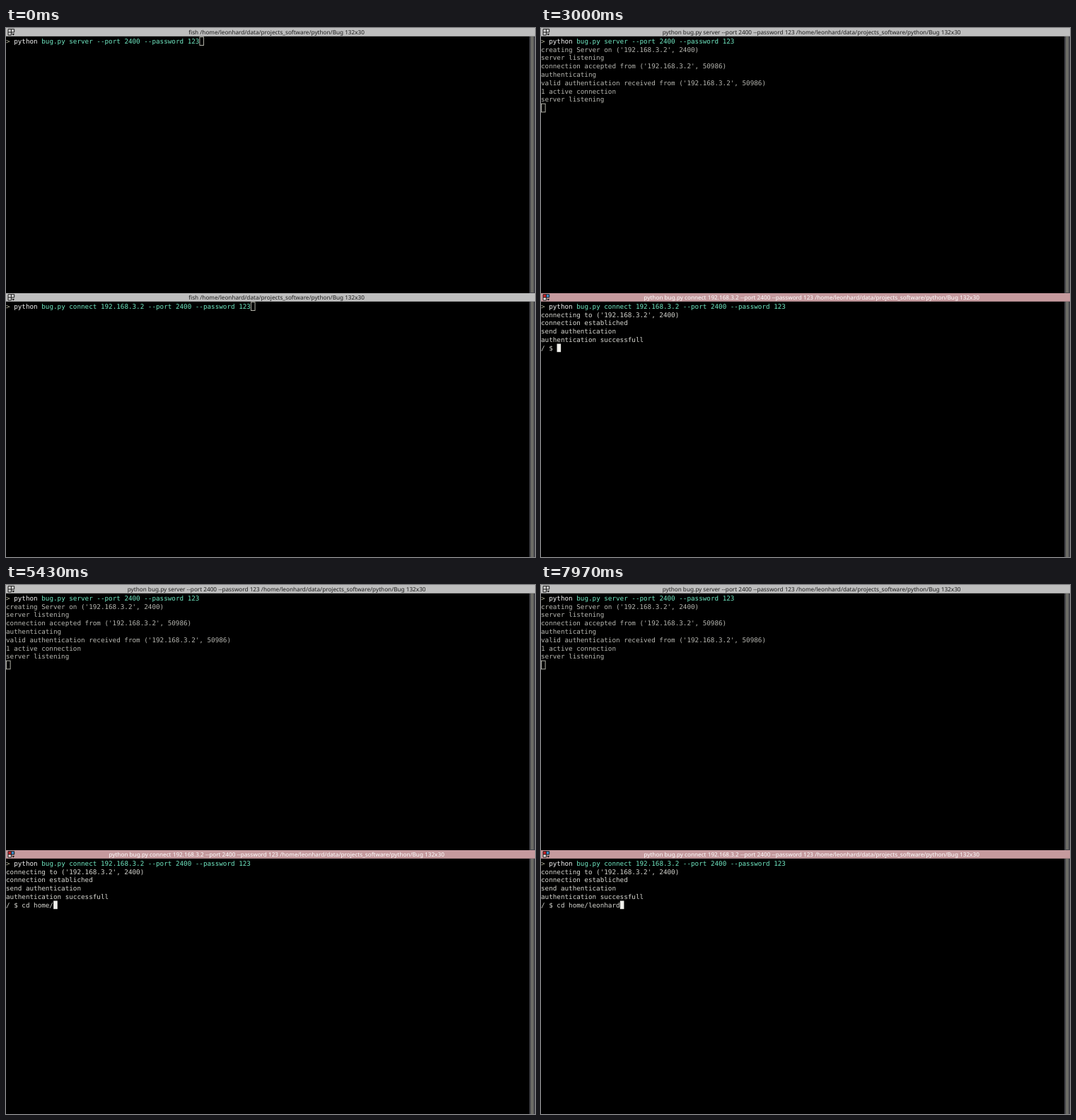
Recreate the animation shown at these times as an HTML page. Size 748 by 748 pixels, loop 8000 ms.

```html
<!DOCTYPE html>
<html lang="en">
<head>
<meta charset="utf-8">
<title>Two terminals</title>
<style>
  html, body { margin: 0; width: 100%; height: 100%; overflow: hidden; background: #000; }
  svg { display: block; width: 100vw; height: 100vh; }
  text { white-space: pre; text-rendering: geometricPrecision; }
  .mono { font: 9.27px "DejaVu Sans Mono", monospace; }
  .title { font: 8.2px "Noto Sans", "Open Sans", sans-serif; text-anchor: middle; }
</style>
</head>
<body>
<svg id="stage" viewBox="0 0 748 748"></svg>
<script>
const LOOP = 8000, CHAR = 5.58, LINE = 11.8;
const CWD = '/home/leonhard/data/projects_software/python/Bug 132x30';
const ADDR = "('192.168.3.2', ";
const TYPED = 'cd home/leonhard';
const SERVER = 'bug.py server --port 2400 --password 123';
const CLIENT = 'bug.py connect 192.168.3.2 --port 2400 --password 123';

// When each pane gets the focus, each command starts, and typing runs
const FOCUS_TOP = 600, FOCUS_BOTTOM = 1800;
const RUN_SERVER = 1450, RUN_CLIENT = 2550;
const TYPE_START = 2960, TYPE_STEP = 305;

const serverLog = [
  [1560, `creating Server on ${ADDR}2400)`],
  [1560, 'server listening'],
  [2610, `connection accepted from ${ADDR}50986)`],
  [2610, 'authenticating'],
  [2720, `valid authentication received from ${ADDR}50986)`],
  [2720, '1 active connection'],
  [2720, 'server listening']
];
const clientLog = [
  [2610, `connecting to ${ADDR}2400)`],
  [2610, 'connection establiched'],
  [2610, 'send authentication'],
  [2720, 'authentication successfull']
];

const stage = document.getElementById('stage');
const rect = (x, y, w, h, fill, more = '') =>
  `<rect x="${x}" y="${y}" width="${w}" height="${h}" fill="${fill}" ${more}/>`;
const span = (s, fill) => `<tspan fill="${fill}">${s}</tspan>`;
const row = (i, s) => `<text class="mono" x="0" y="${21.7 + i * LINE}">${s}</text>`;

function icon(active) {
  const [a, b, c] = active ? ['#d8232a', '#3c8fd0', '#e8e4e4'] : ['#d2d2d2', '#d2d2d2', '#d2d2d2'];
  return rect(3, 1.5, 4.5, 4.5, a) + rect(7.5, 1.5, 4.5, 4.5, b) + rect(3, 6, 4.5, 4, c) +
    `<path d="M3 1.7H11.7V6H3ZM3 6V10H7.4V1.7" fill="none" stroke="#181818" stroke-width="1"/>
     <path d="M8.3 8H12.2L10.2 10.6Z" fill="#181818"/>`;
}

function cursor(col, line, active) {
  const x = col * CHAR, y = 12.5 + line * LINE;
  return active
    ? rect(x + .2, y, 5.6, 11.7, '#f0f0ec')
    : rect(x + .5, y + .2, 5.6, 11.8, 'none', 'stroke="#c4c4b8" stroke-width=".9"');
}

function pane(y, p) {
  const prompt = span('> ', '#b4b49c') + span('python ', '#f4f4f4') + span(p.args, '#70e8c2');
  const lines = [prompt, ...p.lines.map(s => span(s, p.active ? '#d6d6d0' : '#b6b6b0'))];
  const title = (p.running ? 'python ' + p.args : 'fish') + ' ' + CWD;
  return `<g transform="translate(0 ${y})">` +
    rect(0, 0, 748, 375, '#000') +
    rect(740, 12, 8, 363, '#424248') + rect(742, 12, 4, 362, '#6c6c66') +
    rect(0, 0, 748, 11.8, p.active ? '#c59a9e' : '#bebebe') +
    icon(p.active) +
    `<text class="title" x="382.6" y="8.9" fill="${p.active ? '#fff' : '#1c1c1c'}">${title}</text>` +
    lines.map((s, i) => row(i, s)).join('') +
    cursor(p.col, p.line, p.active) + '</g>';
}

const shown = (log, t) => log.filter(e => t >= e[0]).map(e => e[1]);

function topPane(t) {
  const running = t >= RUN_SERVER, lines = shown(serverLog, t);
  return {
    args: SERVER, running, lines,
    active: t >= FOCUS_TOP && t < FOCUS_BOTTOM,
    col: running ? 0 : 9 + SERVER.length,
    line: running ? lines.length + 1 : 0
  };
}

function bottomPane(t) {
  const running = t >= RUN_CLIENT, lines = shown(clientLog, t);
  let col = running ? 0 : 9 + CLIENT.length;
  let line = running ? lines.length + 1 : 0;
  if (lines.length === clientLog.length) {
    const n = Math.max(0, Math.floor((t - TYPE_START) / TYPE_STEP));
    const input = '/ $ ' + TYPED.slice(0, n);
    lines.push(input);
    col = input.length;
    line = lines.length;
  }
  return { args: CLIENT, running, lines, active: t >= FOCUS_BOTTOM, col, line };
}

let last = '';
function draw(t) {
  const html = pane(0, topPane(t)) + pane(375, bottomPane(t));
  if (html !== last) stage.innerHTML = last = html;
}

const start = performance.now();
function tick(now) {
  draw(Math.max(0, now - start) % LOOP);
  requestAnimationFrame(tick);
}
draw(0);
requestAnimationFrame(tick);
</script>
</body>
</html>
```
